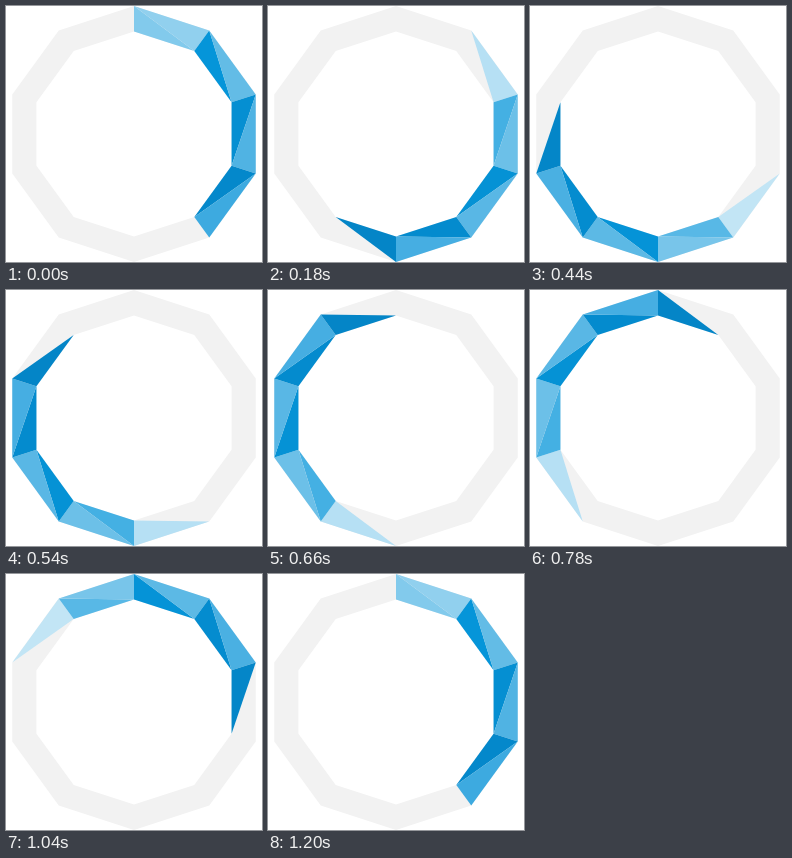
Recreate the animation shown at these times as an HTML page. Size 256x256 px, loop 1220 ms.

```html
<!DOCTYPE html>
<html lang="en">
<head>
<meta charset="utf-8">
<title>Loader</title>
<style>
html, body { margin: 0; width: 100%; height: 100%; overflow: hidden; background: #fff; }
svg { display: block; width: 100vw; height: 100vh; }
</style>
</head>
<body>
<svg viewBox="0 0 256 256"><path id="ring" fill="#f2f2f2" fill-rule="evenodd"/></svg>
<script>
const SIDES = 10, COUNT = SIDES * 2, LIT = 8;
const LOOP = 1220, TICK = 20, STEP = 60;
const WORN_AGE = 5, TINT_RATE = .25;

const WHITE = [255, 255, 255];
const INNER = { fresh: [4, 133, 199], worn: [5, 149, 217] };
const OUTER = { fresh: [61, 170, 224], worn: [108, 192, 232] };

const svg = document.querySelector('svg');
const clamp = v => Math.min(1, Math.max(0, v));
const mix = (a, b, f) => a.map((v, c) => v + (b[c] - v) * f);

function corner(k, radius) {
  const a = k * 2 * Math.PI / SIDES;
  return [128 + radius * Math.sin(a), 128 - radius * Math.cos(a)].map(v => v.toFixed(2)).join();
}
const outer = k => corner(k, 128);
const inner = k => corner(k, 102.6);

const outline = f => 'M' + Array.from({ length: SIDES }, (_, k) => f(k)).join('L') + 'Z';
document.getElementById('ring').setAttribute('d', outline(outer) + outline(inner));

// Each side of the ring is split into an inner and an outer triangle
const tris = Array.from({ length: COUNT }, (_, i) => {
  const k = i >> 1;
  const third = i % 2 ? outer(k + 1) : inner(k);
  const p = document.createElementNS('http://www.w3.org/2000/svg', 'polygon');
  p.setAttribute('points', [outer(k), inner(k + 1), third].join(' '));
  return svg.appendChild(p);
});

// Age in steps: the base colour wears first, then pales towards white
function colourAt({ fresh, worn }, age) {
  const base = mix(fresh, worn, clamp(age / WORN_AGE));
  return `rgb(${mix(base, WHITE, clamp((age - WORN_AGE) * TINT_RATE)).map(Math.round)})`;
}

function draw() {
  const t = Math.floor(performance.now() % LOOP / TICK) * TICK;
  const head = t / STEP + LIT - 1;
  tris.forEach((p, i) => {
    const age = (head - i + .5 + COUNT) % COUNT - .5;
    const lit = age < LIT - .5;
    p.setAttribute('fill', lit ? colourAt(i % 2 ? OUTER : INNER, age) : 'none');
  });
  requestAnimationFrame(draw);
}
draw();
</script>
</body>
</html>
```
